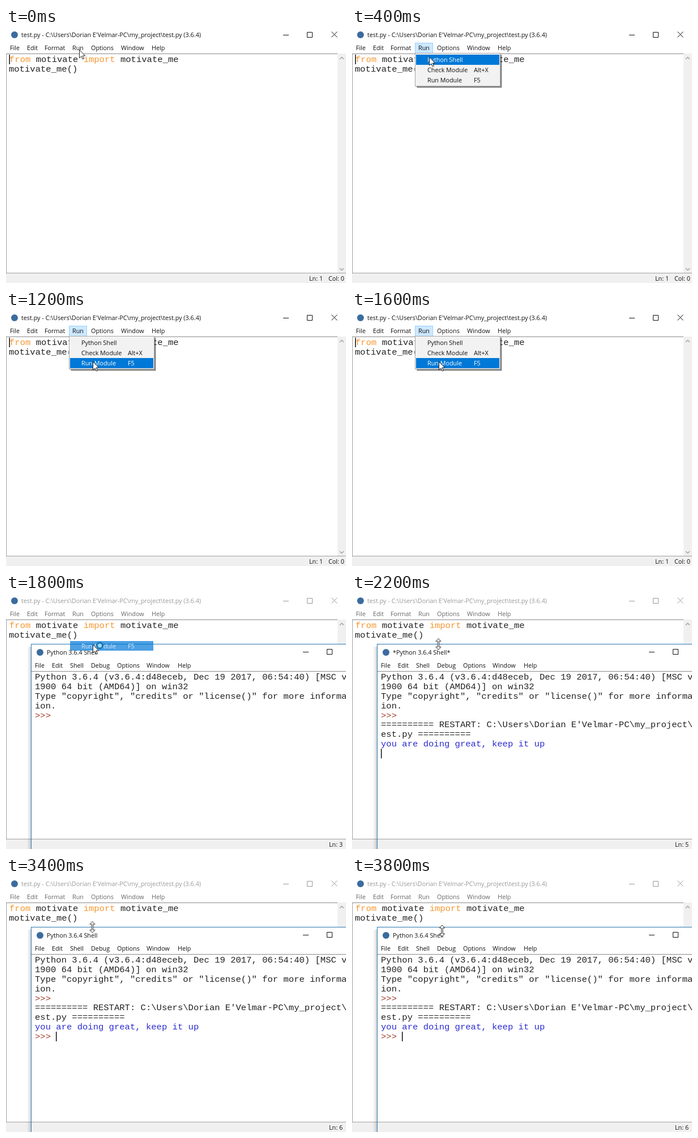
Recreate the animation shown at these times as an HTML page. Size 600 by 450 pixels, loop 4 s.

```html
<!DOCTYPE html>
<html lang="en">
<head>
<meta charset="utf-8">
<title>Running a script</title>
<style>
html, body { margin: 0; height: 100%; overflow: hidden; background: #fff; }
svg { display: block; width: 600px; height: 450px; }
text { font: 10.8px "Open Sans", "Noto Sans", sans-serif; fill: #111; white-space: pre; }
.code text { font: 15.56px "Liberation Mono", "Courier New", monospace; fill: #222; }
.code .key { fill: #f5962f; }
.code .prompt { fill: #a04030; }
.code .out { fill: #2c2cd0; }
.icon { fill: none; stroke: #111; }
.arrow { fill: none; stroke: #a3a3a3; stroke-width: 1.5; }
.pick rect { fill: #0078d7; }
.pick text { fill: #fff; }

/* Everything changes in hard steps: 5% = 200 ms. */
.step { animation: 4s step-end infinite; }
.timed { opacity: 0; }

.title { animation-name: dim-title; }
.bar text { animation: dim-bar 4s step-end infinite; }
.buttons { animation-name: dim-buttons; }
@keyframes dim-title { 45%, to { fill: #999; } }
@keyframes dim-bar { 45%, to { fill: #666; } }
@keyframes dim-buttons { 45%, to { stroke: #999; } }

.edit-caret { animation-name: edit-caret; }
@keyframes edit-caret { 20% { opacity: 0; } 25% { opacity: 1; } 45%, to { opacity: 0; } }

.menu { animation-name: menu; }
.pick1 { animation-name: pick1; }
.pick2 { animation-name: pick2; }
.pick3 { animation-name: pick3; }
.ghost, .first { animation-name: starting; }
@keyframes menu { 5% { opacity: 1; } 45%, to { opacity: 0; } }
@keyframes pick1 { 10% { opacity: 1; } 15%, to { opacity: 0; } }
@keyframes pick2 { 15% { opacity: 1; } 25%, to { opacity: 0; } }
@keyframes pick3 { 25% { opacity: 1; } 45%, to { opacity: 0; } }
@keyframes starting { 45% { opacity: 1; } 50%, to { opacity: 0; } }
.ghost rect { opacity: .7; }
.ghost text { fill: #d5e9f9; }

.shell { animation-name: from-shell; }
.restart, .resize-on { animation-name: from-restart; }
.output { animation-name: from-output; }
.ready { animation-name: from-ready; }
.busy { animation-name: busy; }
.idle-title { animation-name: idle-title; }
@keyframes from-shell { 45%, to { opacity: 1; } }
@keyframes from-restart { 50%, to { opacity: 1; } }
@keyframes from-output { 55%, to { opacity: 1; } }
@keyframes from-ready { 60%, to { opacity: 1; } }
@keyframes busy { 50% { opacity: 1; } 60%, to { opacity: 0; } }
@keyframes idle-title { 50% { opacity: 0; } 60%, to { opacity: 1; } }

.shell-caret { animation-name: shell-caret; }
@keyframes shell-caret {
  50% { opacity: 1; transform: translate(51px, 256px); }
  55% { opacity: 1; transform: translate(51px, 273px); }
  60% { opacity: 1; transform: translate(88px, 273px); }
  65% { opacity: 0; transform: translate(88px, 273px); }
  75% { opacity: 1; transform: translate(88px, 273px); }
  90% { opacity: 0; transform: translate(88px, 273px); }
  95%, to { opacity: 1; transform: translate(88px, 273px); }
}

.pointer { transform: translate(129px, 38px); animation-name: pointer; }
@keyframes pointer {
  10% { transform: translate(136px, 51px); }
  15% { transform: translate(143px, 69px); }
  20% { transform: translate(148px, 84px); }
  25% { transform: translate(152px, 91px); }
  30% { transform: translate(153px, 89px); }
  45% { transform: translate(153px, 89px); }
  50%, to { opacity: 0; }
}
.resize { transform: translate(152.5px, 88.5px); animation-name: resize; }
@keyframes resize { 95%, to { transform: translate(159px, 95px); } }
</style>
</head>
<body>
<svg viewBox="0 0 600 450">
  <defs>
    <linearGradient id="shade">
      <stop offset="0" stop-color="#000" stop-opacity="0"/>
      <stop offset="1" stop-color="#000" stop-opacity=".16"/>
    </linearGradient>
  </defs>

  <!-- editor window -->
  <rect width="600" height="450" fill="#fff"/>
  <circle cx="15" cy="12" r="6" fill="#3b6c9e"/>
  <text class="title step" x="27" y="16">test.py - C:\Users\Dorian E'Velmar-PC\my_project\test.py (3.6.4)</text>
  <g class="icon buttons step">
    <path d="M489 12.5h10M531.5 7.5h9v9h-9zM574.5 6.5l10 10m0-10l-10 10"/>
  </g>
  <path d="M0 45.5H585" stroke="#8a8a8a"/>
  <path d="M.5 45V433" stroke="#a0a0a0"/>
  <rect x="585" y="45" width="15" height="388" fill="#f0f0f0"/>
  <path class="arrow" d="M589 55l3.5-3.5 3.5 3.5M589 424l3.5 3.5 3.5-3.5"/>
  <rect y="433" width="600" height="17" fill="#f0f0f0"/>
  <path d="M0 432.5H600" stroke="#a0a0a0"/>
  <text x="535" y="446">Ln: 1</text>
  <text x="569" y="446">Col: 0</text>
  <rect class="menu step timed" x="111.5" y="26.5" width="31" height="18" fill="#cce8ff" stroke="#99d1ff"/>
  <g class="bar">
    <text x="7" y="39">File</text>
    <text x="37" y="39">Edit</text>
    <text x="68" y="39">Format</text>
    <text x="117" y="39">Run</text>
    <text x="150" y="39">Options</text>
    <text x="203" y="39">Window</text>
    <text x="257" y="39">Help</text>
  </g>
  <g class="code">
    <text x="6" y="60"><tspan class="key">from</tspan> motivate <tspan class="key">import</tspan> motivate_me</text>
    <text x="5" y="77">motivate_me()</text>
  </g>
  <rect class="edit-caret step" x="5.5" y="47" width="1.5" height="17" fill="#111"/>

  <!-- drop-down menu -->
  <g class="menu step timed">
    <rect x="115" y="48" width="150" height="58" fill="#000" opacity=".18"/>
    <rect x="114" y="47" width="150" height="58" fill="#000" opacity=".38"/>
    <rect x="111.5" y="44.5" width="150" height="58" fill="#f2f2f2" stroke="#a5a5a5"/>
    <text x="133" y="60">Python Shell</text>
    <text x="133" y="78">Check Module</text>
    <text x="215" y="78">Alt+X</text>
    <text x="133" y="96">Run Module</text>
    <text x="215" y="96">F5</text>
  </g>
  <g class="pick pick1 step timed">
    <rect x="113" y="47" width="147" height="18"/>
    <text x="133" y="60">Python Shell</text>
  </g>
  <g class="pick pick2 step timed">
    <rect x="113" y="65" width="147" height="18"/>
    <text x="133" y="78">Check Module</text>
    <text x="215" y="78">Alt+X</text>
  </g>
  <g class="pick pick3 step timed">
    <rect x="113" y="83" width="147" height="18"/>
    <text x="133" y="96">Run Module</text>
    <text x="215" y="96">F5</text>
  </g>

  <!-- shell window -->
  <g class="shell step timed">
    <rect x="37" y="93" width="7" height="357" fill="url(#shade)"/>
    <rect x="44.5" y="88.5" width="570" height="380" fill="#fff" stroke="#2a78b0"/>
    <circle cx="60" cy="103" r="6" fill="#3b6c9e"/>
    <text class="idle-title step" x="72" y="107">Python 3.6.4 Shell</text>
    <text class="busy step timed" x="72" y="107">*Python 3.6.4 Shell*</text>
    <path class="icon" d="M524 102.5h10M566.5 97.5h9v9h-9z"/>
    <text x="51" y="130">File</text>
    <text x="81" y="130">Edit</text>
    <text x="113" y="130">Shell</text>
    <text x="150" y="130">Debug</text>
    <text x="196" y="130">Options</text>
    <text x="248" y="130">Window</text>
    <text x="303" y="130">Help</text>
    <path d="M45 136.5H600" stroke="#8a8a8a"/>
    <g class="code">
      <text x="51" y="151">Python 3.6.4 (v3.6.4:d48eceb, Dec 19 2017, 06:54:40) [MSC v.</text>
      <text x="51" y="168">1900 64 bit (AMD64)] on win32</text>
      <text x="51" y="185">Type "copyright", "credits" or "license()" for more informat</text>
      <text x="51" y="202">ion.</text>
      <text class="prompt" x="51" y="219">&gt;&gt;&gt;</text>
      <g class="restart step timed">
        <text x="51" y="235">========== RESTART: C:\Users\Dorian E'Velmar-PC\my_project\t</text>
        <text x="51" y="252">est.py ==========</text>
      </g>
      <text class="out output step timed" x="51" y="269">you are doing great, keep it up</text>
      <text class="prompt ready step timed" x="51" y="286">&gt;&gt;&gt;</text>
    </g>
    <rect class="shell-caret step timed" width="1.5" height="17" fill="#111"/>
    <rect x="45" y="433" width="555" height="17" fill="#f0f0f0"/>
    <path d="M45 432.5H600" stroke="#a0a0a0"/>
    <text class="first step timed" x="570" y="446">Ln: 3</text>
    <text class="busy step timed" x="570" y="446">Ln: 5</text>
    <text class="ready step timed" x="570" y="446">Ln: 6</text>
  </g>
  <g class="pick ghost step timed">
    <rect x="113" y="83" width="147" height="17"/>
    <text x="133" y="96">Run Module</text>
    <text x="215" y="96">F5</text>
  </g>

  <!-- mouse pointers -->
  <g class="pointer step">
    <path d="M.5.5V15l3.4-3.2 2.4 5.2 2.2-1-2.4-5h4.6z" fill="#fff" stroke="#111" stroke-width=".9"/>
  </g>
  <circle class="first step timed" cx="165.5" cy="91" r="5" fill="#a5d8f5" stroke="#1676b8" stroke-width="3"/>
  <g class="resize-on step timed">
    <path class="resize step" d="M0-10L4.5-5H1.2V5H4.5L0 10L-4.5 5H-1.2V-5H-4.5Z" fill="#fff" stroke="#111" stroke-width=".9"/>
  </g>
</svg>
</body>
</html>
```
